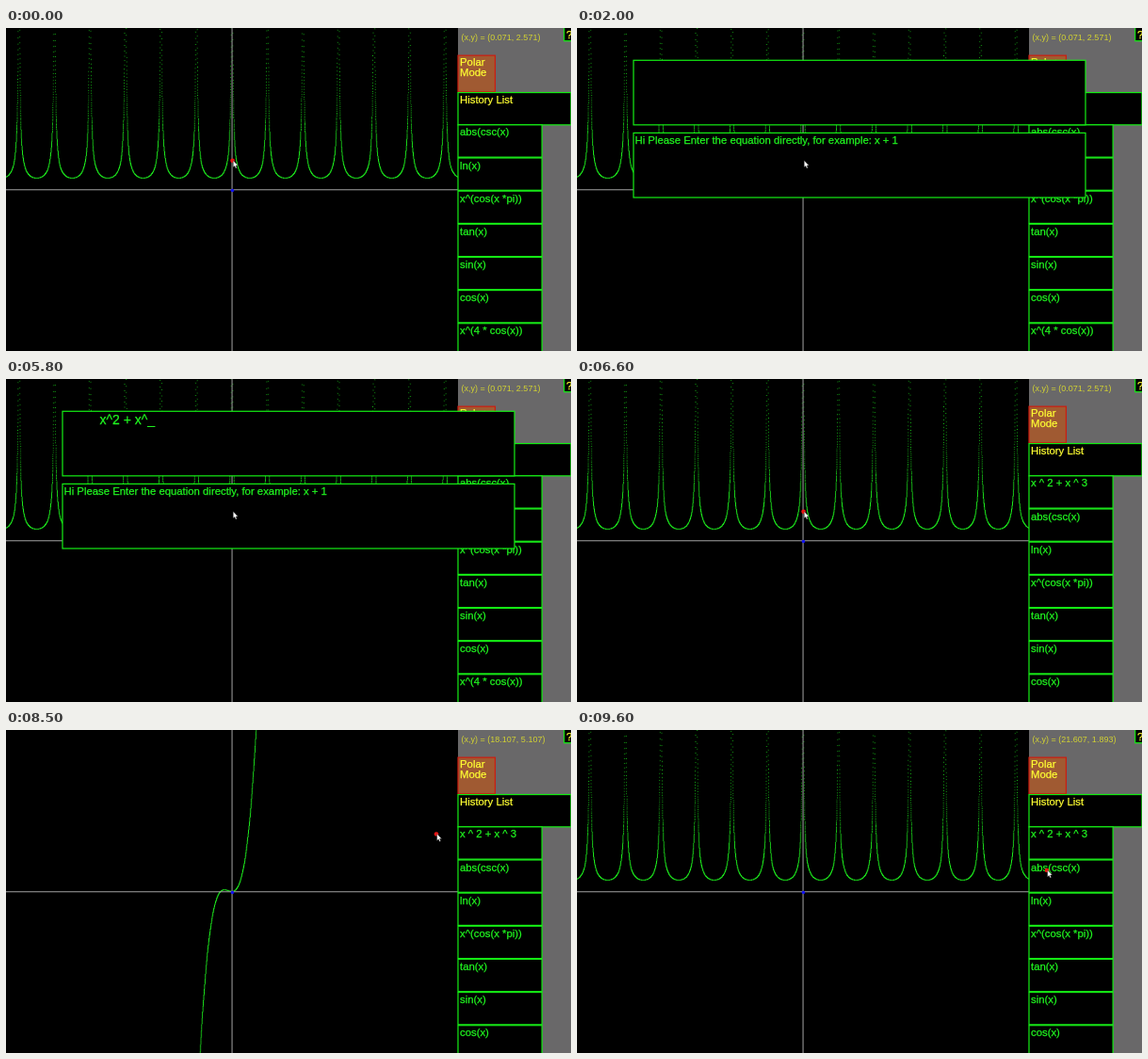
An HTML page with a canvas for the animation above (9700 ms loop, 600 by 343 pixels).

```html
<!DOCTYPE html>
<html lang="en">
<head>
<meta charset="utf-8">
<title>Graphing calculator</title>
<style>
  html, body { margin: 0; width: 100%; height: 100%; overflow: hidden; background: #000; }
  canvas, svg { position: absolute; left: 0; top: 0; width: 600px; height: 343px; display: block; }
  text {
    font: 11.35px "Liberation Sans", Arial, sans-serif; white-space: pre;
    fill: #20f820; stroke: #20f820; stroke-width: 0.25;
  }
  .box { fill: #000; stroke: #14ee14; stroke-width: 1.2; }
  .polar { fill: #a05a32; stroke: #cc1c10; }
  .yellow { fill: #ff3; stroke: #ff3; }
  #coords { font-size: 9px; fill: #d2d232; stroke: none; }
  #typed { font-size: 14px; }
</style>
</head>
<body>
<canvas id="plot" width="600" height="343"></canvas>
<svg id="ui" viewBox="0 0 600 343"></svg>
<script>
const LOOP = 9700, STEP = 100;
const K = 3 / 7; // layout is designed at 1400 x 800
const UNIT = 28 * K, OX = 560 * K, OY = 400 * K;
const OPEN = 100, ENTER = 6500, PICK_CUBIC = 7600, PICK_CSC = 9200;

const typing = [
  [2400, 'x_'], [2800, 'x^_'], [3400, 'x^2_'], [3900, 'x^2 _'], [4300, 'x^2 +_'],
  [4500, 'x^2 + _'], [5400, 'x^2 + x_'], [5800, 'x^2 + x^_'], [6000, 'x^2 + x^3_']
];
// time, x, y in graph units
const mouse = [
  [6700, 0.071, 2.571], [7400, 22, 4.6], [7800, 22, 4.6], [8400, 18.107, 5.107],
  [8600, 18.107, 5.107], [9100, 22, 1.75], [9300, 22, 1.75], [9600, 21.607, 1.893]
];
const oldItems = ['abs(csc(x)', 'ln(x)', 'x^(cos(x *pi))', 'tan(x)', 'sin(x)', 'cos(x)', 'x^(4 * cos(x))'];
const newItems = ['x ^ 2 + x ^ 3', ...oldItems.slice(0, 6)];

const ui = document.getElementById('ui');
function add(tag, attrs, parent = ui, content) {
  const el = document.createElementNS('http://www.w3.org/2000/svg', tag);
  for (const k in attrs) el.setAttribute(k, attrs[k]);
  if (content) el.textContent = content;
  parent.appendChild(el);
  return el;
}
const box = (x, y, w, h, parent, kind = '') =>
  add('rect', { class: 'box ' + kind, x: x * K, y: y * K, width: w * K, height: h * K }, parent);
const label = (x, y, str, parent, attrs = {}) => add('text', { x, y, ...attrs }, parent, str);
const yellow = { class: 'yellow' };

// Dotted curve, plotted large and scaled down
function curve(f) {
  const big = document.createElement('canvas');
  big.width = 1400;
  big.height = 800;
  const g = big.getContext('2d');
  g.fillStyle = '#20ff20';
  g.globalAlpha = 0.8;
  for (let x = -20; x < 20; x += 0.0031) {
    const y = 400 - 28 * f(x);
    if (y > -3 && y < 803) g.fillRect(Math.round(560 + 28 * x) - 1, Math.round(y) - 1, 2, 2);
  }
  return big;
}
const csc = curve(x => Math.abs(1 / Math.sin(x)));
const cubic = curve(x => x * x + x * x * x);
const ctx = document.getElementById('plot').getContext('2d');
let shown = null;
function drawPlot(img) {
  if (img === shown) return;
  shown = img;
  ctx.fillStyle = '#000';
  ctx.fillRect(0, 0, 600, 343);
  ctx.imageSmoothingQuality = 'high';
  ctx.drawImage(img, 0, 0, 1400 * K, 800 * K);
  ctx.fillStyle = '#a4a4a4';
  ctx.fillRect(OX - 0.45, 0, 1, 343);
  ctx.fillRect(0, OY - 0.15, 480, 1);
  ctx.fillStyle = '#1010f0';
  ctx.beginPath();
  ctx.arc(OX + 0.4, OY + 1, 1.8, 0, 7);
  ctx.fill();
}

// Side panel
add('rect', { x: 480, y: 0, width: 120, height: 343, fill: '#696869' });
const coords = label(483.6, 13, '', ui, { id: 'coords' });
box(1383, -2, 30, 34);
label(595, 10.6, '?', ui, yellow);
box(1120, 68, 92, 90, ui, 'polar');
label(482, 39.8, 'Polar', ui, yellow);
label(482, 50.5, 'Mode', ui, yellow);
box(1120, 160, 280, 80);
label(482, 79.8, 'History List', ui, yellow);
const items = oldItems.map((s, i) => {
  const y = 240 + 82 * i;
  box(1120, y, 208, 80);
  return label(482, y * K + 11.5, s);
});

const dot = add('circle', { r: 2.3, fill: '#f01414' });
const dialog = add('g', {});
box(140, 80, 1120, 160, dialog);
box(140, 260, 1120, 160, dialog);
label(61.5, 122.7, 'Hi Please Enter the equation directly, for example: x + 1', dialog);
const typed = label(99.4, 47.8, '', dialog, { id: 'typed' });
const pointer = add('path', {
  d: 'M0 0V7.2L1.6 5.8L2.7 8.3L3.9 7.8L2.9 5.3H5Z',
  fill: '#fff', stroke: '#222', 'stroke-width': 0.4
});

function mouseAt(t) {
  let a = mouse[0], b = a;
  for (const k of mouse) {
    b = k;
    if (k[0] > t) break;
    a = k;
  }
  const p = b[0] > a[0] ? Math.max(0, (t - a[0]) / (b[0] - a[0])) : 0;
  const e = p * p * (3 - 2 * p);
  return [1, 2].map(i => Math.round((a[i] + (b[i] - a[i]) * e) * 28) / 28);
}

function render(time) {
  const t = Math.floor((time % LOOP) / STEP) * STEP;
  drawPlot(t >= PICK_CUBIC && t < PICK_CSC ? cubic : csc);

  const list = t < ENTER ? oldItems : newItems;
  items.forEach((el, i) => { el.textContent = list[i]; });
  dialog.style.display = t >= OPEN && t < ENTER ? '' : 'none';
  typed.textContent = typing.reduce((s, [at, str]) => t >= at ? str : s, '');

  const [x, y] = mouseAt(t);
  const px = OX + UNIT * x, py = OY - UNIT * y;
  coords.textContent = `(x,y) = (${x.toFixed(3)}, ${y.toFixed(3)})`;
  dot.setAttribute('cx', px - 0.3);
  dot.setAttribute('cy', py + 0.3);
  pointer.setAttribute('transform', `translate(${px + 0.4} ${py + 0.1})`);
}

const start = performance.now();
function tick() {
  render(performance.now() - start);
  requestAnimationFrame(tick);
}
tick();
</script>
</body>
</html>
```
